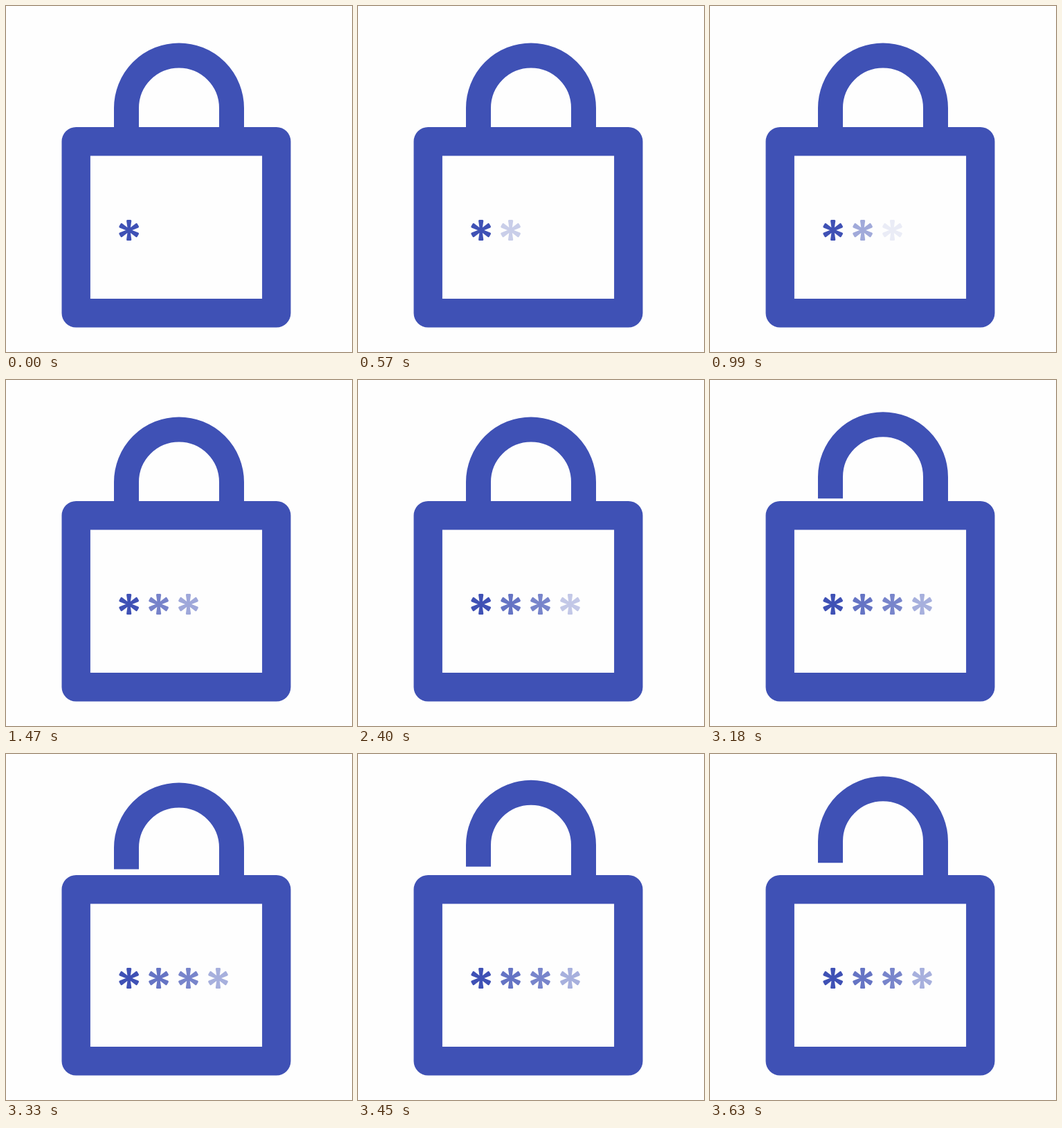
An HTML page with a canvas that plays this animation: 500 by 500 pixels, repeating every 4.2 s.

```html
<!DOCTYPE html>
<html lang="en">
<head>
<meta charset="utf-8">
<title>Lock opening</title>
<style>
  html, body { margin: 0; width: 100%; height: 100%; overflow: hidden; background: #fefefe; }
  canvas { display: block; width: 500px; height: 500px; }
</style>
</head>
<body>
<canvas id="stage" width="500" height="500"></canvas>
<script>
const ctx = document.getElementById('stage').getContext('2d');
const LOOP = 4200;
const INK = '#3f51b5';
const PAPER = '#fefefe';

// The stars brighten in discrete steps at these times (ms).
const FADE_STEPS = [0, 210, 390, 570, 780, 990, 1110, 1230, 1350, 1470,
                    1590, 1710, 1950, 2160, 2400, 2640];

// Each star: centre x and [time, opacity] keys.
const STARS = [
  { x: 177.7, keys: [[0, 1]] },
  { x: 220.6, keys: [[0, 0], [570, 0.28], [1470, 0.71], [1710, 0.8]] },
  { x: 263.5, keys: [[870, 0], [1470, 0.5], [1710, 0.7]] },
  { x: 306.5, keys: [[1860, 0], [2400, 0.31], [2640, 0.45]] }
];

const LIFT = { start: 2940, end: 3630, step: 30, height: 21.2 };

function valueAt(keys, t) {
  if (t <= keys[0][0]) return keys[0][1];
  for (let i = 1; i < keys.length; i++) {
    const [t0, v0] = keys[i - 1], [t1, v1] = keys[i];
    if (t < t1) return v0 + (v1 - v0) * (t - t0) / (t1 - t0);
  }
  return keys[keys.length - 1][1];
}

function liftAt(t) {
  const held = Math.floor(t / LIFT.step) * LIFT.step;
  const p = (held - LIFT.start) / (LIFT.end - LIFT.start);
  return LIFT.height * Math.min(1, Math.max(0, p));
}

function drawShackle(lift) {
  const y = 147.5 - lift;
  ctx.lineWidth = 36;
  ctx.lineJoin = 'miter';
  ctx.beginPath();
  ctx.moveTo(174, y + 31);
  ctx.lineTo(174, y);
  ctx.arc(250, y, 76, Math.PI, 0);
  ctx.lineTo(326, 190);
  ctx.stroke();
}

function drawBody() {
  ctx.lineWidth = 41.4;
  ctx.lineJoin = 'round';
  ctx.strokeRect(101.2, 195.7, 289.6, 248.1);
}

function drawStar(x, opacity) {
  if (opacity <= 0) return;
  ctx.save();
  ctx.translate(x, 324);
  ctx.globalAlpha = opacity;
  ctx.beginPath();
  for (let i = 0; i < 6; i++) {
    ctx.moveTo(-1.7, 0);
    ctx.lineTo(-3.6, -13.4);
    ctx.quadraticCurveTo(-3.7, -15, -2.2, -15.1);
    ctx.lineTo(2.2, -15.1);
    ctx.quadraticCurveTo(3.7, -15, 3.6, -13.4);
    ctx.lineTo(1.7, 0);
    ctx.closePath();
    ctx.rotate(Math.PI / 3);
  }
  ctx.fill();
  ctx.restore();
}

function draw(t) {
  ctx.fillStyle = PAPER;
  ctx.fillRect(0, 0, 500, 500);
  ctx.fillStyle = ctx.strokeStyle = INK;
  drawShackle(liftAt(t));
  drawBody();
  const fadeTime = FADE_STEPS.filter(s => s <= t).pop();
  for (const star of STARS) drawStar(star.x, valueAt(star.keys, fadeTime));
}

const origin = performance.now();
function tick() {
  draw((performance.now() - origin) % LOOP);
  requestAnimationFrame(tick);
}
tick();
</script>
</body>
</html>
```
